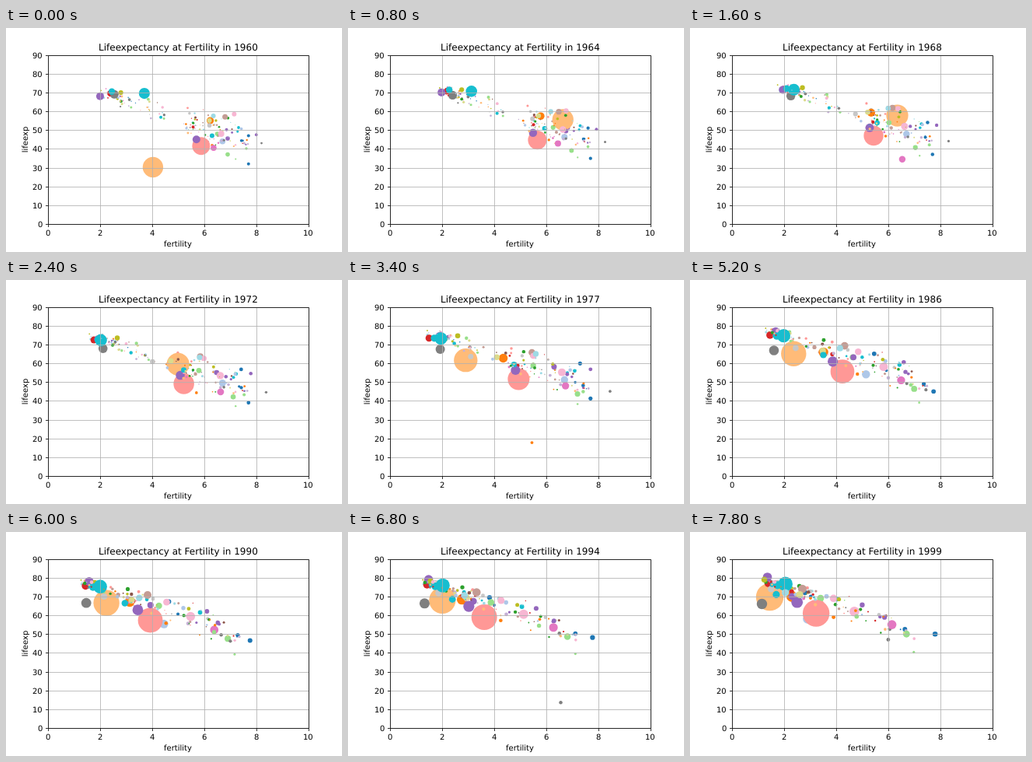
These frames come from a looping animation (432 by 288 pixels, 8 s). An HTML page:

```html
<!DOCTYPE html>
<html lang="en">
<head>
<meta charset="utf-8">
<title>Life expectancy and fertility</title>
<style>
html, body { margin: 0; width: 100%; height: 100%; overflow: hidden; background: #fff; }
svg { display: block; width: 432px; height: 288px; }
text { font: 10px "DejaVu Sans", sans-serif; text-rendering: geometricPrecision; }
#title { font-size: 12px; text-anchor: middle; }
#grid { stroke: #b0b0b0; stroke-width: .8; fill: none; }
#frame { stroke: #000; stroke-width: .8; fill: none; }
</style>
</head>
<body>
<svg viewBox="0 0 432 288">
  <g id="dots"></g>
  <path id="grid"/>
  <path id="frame"/>
  <g id="labels">
    <text id="title" x="221.4" y="29"></text>
    <text transform="translate(28 143.5) rotate(-90)" text-anchor="middle">lifeexp</text>
  </g>
</svg>
<script>
const STEP = 200, FIRST_YEAR = 1960, YEARS = 40, LAST = YEARS - 1;
const $ = id => document.getElementById(id);
const toX = fertility => 54 + 33.48 * fertility;
const toY = life => 252 - 2.416 * life;
const lerp = (a, b, k) => a + (b - a) * k;

function add(parent, tag, attrs) {
  const el = document.createElementNS('http://www.w3.org/2000/svg', tag);
  for (const key in attrs) el.setAttribute(key, attrs[key]);
  parent.append(el);
  return el;
}

// Text starts on a whole pixel; align is the share of its width left of x
function label(text, x, y, align) {
  const el = add($('labels'), 'text', { y: Math.round(y) });
  el.textContent = text;
  el.setAttribute('x', Math.round(x - align * el.getComputedTextLength()));
}

// Axes
const snap = v => Math.floor(v + .5) + .5;
let grid = '', frame = 'M54.5 35.5H389.5V252.5H54.5Z';
for (let f = 0; f <= 10; f += 2) {
  const x = snap(toX(f));
  grid += `M${x} 35.5V252.5`;
  frame += `M${x} 252.5v3.5`;
  label(f, toX(f), 267, .5);
}
for (let life = 0; life <= 90; life += 10) {
  const y = snap(toY(life));
  grid += `M54.5 ${y}H389.5`;
  frame += `M54.5 ${y}h-3.5`;
  label(life, 47, toY(life) + 4, 1);
}
label('fertility', 221.4, 281, .5);
$('grid').setAttribute('d', grid);
$('frame').setAttribute('d', frame);

// Motion rules, t in years since the start
const MIDDLE = 17;
const logistic = (t, from, to, middle, spread) =>
  to + (from - to) / (1 + Math.exp((t - middle) / spread));
const dip = (t, year, depth, width) => depth * Math.exp(-(((t - year) / width) ** 2));
const bend = (a, b, c) => t =>
  t < MIDDLE ? lerp(a, b, t / MIDDLE) : lerp(b, c, (t - MIDDLE) / (LAST - MIDDLE));
const rise = (from, to) => t => lerp(from, to, (t / LAST) ** .8);

const C = {
  blue: '#1f77b4', sky: '#aec7e8', orange: '#ff7f0e', peach: '#ffbb78', green: '#2ca02c',
  mint: '#98df8a', red: '#d62728', coral: '#ff9896', purple: '#9467bd', lilac: '#c5b0d5',
  brown: '#8c564b', tan: '#c49c94', magenta: '#e377c2', pink: '#f7b6d2', gray: '#7f7f7f',
  silver: '#c7c7c7', olive: '#bcbd22', sand: '#dbdb8d', cyan: '#17becf', ice: '#9edae5'
};
const palette = Object.values(C);
const bubbles = [];

// Populations grow faster where fertility starts higher
function bubble(color, size, fertility, life) {
  const growth = .085 * fertility(0) / LAST;
  return { color, fertility, life, radius: t => size * (1 + growth * t) };
}
const country = (...args) => bubbles.push(bubble(...args));

// Large countries, back to front
country(C.blue, 2, bend(7.7, 7.3, 2.8), rise(47, 72));
country(C.blue, 2, bend(7.7, 7.7, 7.8), rise(32, 50));
country(C.sky, 3.8, bend(6.7, 6.7, 2.9), rise(44, 58));
country(C.orange, 4.6, bend(6.23, 4.35, 2.3), rise(55, 70));
country(C.orange, 1.6, bend(6.3, 5.45, 3.9), t => rise(42, 59)(t) - dip(t, 17, 33, 3.5));
country(C.peach, 13.2,
  t => logistic(t, 6.7, 2.45, 12.8, 2) - dip(t, .6, 3.2, 1.4) - (t / LAST) ** 6,
  t => rise(53, 69.7)(t) - dip(t, 0, 22.8, 1.8));
country(C.mint, 2.9, bend(6.5, 5.5, 3.4), rise(48, 69));
country(C.mint, 2.8, bend(6.9, 7.2, 6.7), rise(37, 50));
country(C.red, 4.2, bend(2.4, 1.5, 1.4), rise(69.5, 77));
country(C.coral, 11.5, bend(5.88, 4.94, 3.23), rise(41.5, 61));
country(C.purple, 5, bend(5.7, 4.82, 2.5), rise(45, 67));
country(C.purple, 2.8, bend(6.9, 6.3, 2.3), rise(45.5, 70));
country(C.purple, 5, bend(2, 1.9, 1.36), rise(68, 80.3));
country(C.purple, 1.9, bend(8, 7.7, 5), rise(47.5, 65.5));
country(C.tan, 3.5, bend(6.8, 5.45, 2.7), rise(57, 74));
country(C.magenta, 3.8, bend(6.36, 6.74, 6.14), t => rise(40.5, 55)(t) - dip(t, 9, 13, 2));
country(C.pink, 4, bend(6.65, 6.6, 4.7), rise(48, 62));
country(C.pink, 3, bend(7.15, 5.5, 3.9), rise(58.5, 69));
country(C.gray, 5.5, bend(2.55, 1.93, 1.15), rise(69, 66));
country(C.gray, 1.4, bend(8.2, 8.45, 6), t => rise(43, 47)(t) - dip(t, 34, 33, 1));
country(C.silver, 2.8, bend(6.2, 3.1, 1.5), rise(52.5, 74));
country(C.olive, 3, bend(2.8, 2.6, 1.24), rise(70, 79));
country(C.sand, 3, bend(6.2, 4.1, 2.6), rise(55, 71));
country(C.cyan, 3, bend(6.3, 4.76, 1.7), rise(47, 71));
country(C.cyan, 4.2, bend(2.45, 1.7, 1.75), rise(70.5, 76));
country(C.cyan, 7.1, t => logistic(t, 3.95, 1.85, 5, 2.5) + .2 * t / LAST, rise(69.5, 76.6));
country(C.ice, 3, bend(6.35, 5.6, 2.05), rise(57.5, 72));

// Small countries drift down the fertility transition, each at its own date
let seed = 29;
const rand = (lo = 0, hi = 1) => {
  seed = (seed * 16807) % 2147483647;
  return lerp(lo, hi, seed / 2147483647);
};

function smallCountry(color) {
  const early = rand() < .33;
  const high = early ? rand(2.2, 4.8) : rand(5.4, 7.7);
  const low = early ? rand(1.2, 2) : rand(1.6, 3);
  const middle = early ? rand(8, 22) : rand(12, 54);
  const spread = rand(4, 8);
  const offset = rand(-6, 6) + rand(-5, 5);
  const fertility = t => logistic(t, high, low, middle, spread);
  const life = t => {
    const f = fertility(t);
    return Math.min(79, 80 - 4.8 * f + .22 * Math.min(t, 20) + offset * f / 6.5);
  };
  return bubble(color, .5 + 1.5 * rand() ** 1.5, fertility, life);
}
for (let i = 0; i < 130; i++) {
  bubbles.splice(rand(0, bubbles.length), 0, smallCountry(palette[i % palette.length]));
}
for (const b of bubbles) b.el = add($('dots'), 'circle', { fill: b.color });

let shown = -1;
function render() {
  const t = Math.floor(performance.now() / STEP) % YEARS;
  if (t !== shown) {
    shown = t;
    $('title').textContent = `Lifeexpectancy at Fertility in ${FIRST_YEAR + t}`;
    for (const { el, fertility, life, radius } of bubbles) {
      el.setAttribute('cx', toX(fertility(t)).toFixed(2));
      el.setAttribute('cy', toY(life(t)).toFixed(2));
      el.setAttribute('r', radius(t).toFixed(2));
    }
  }
  requestAnimationFrame(render);
}
render();
</script>
</body>
</html>
```
